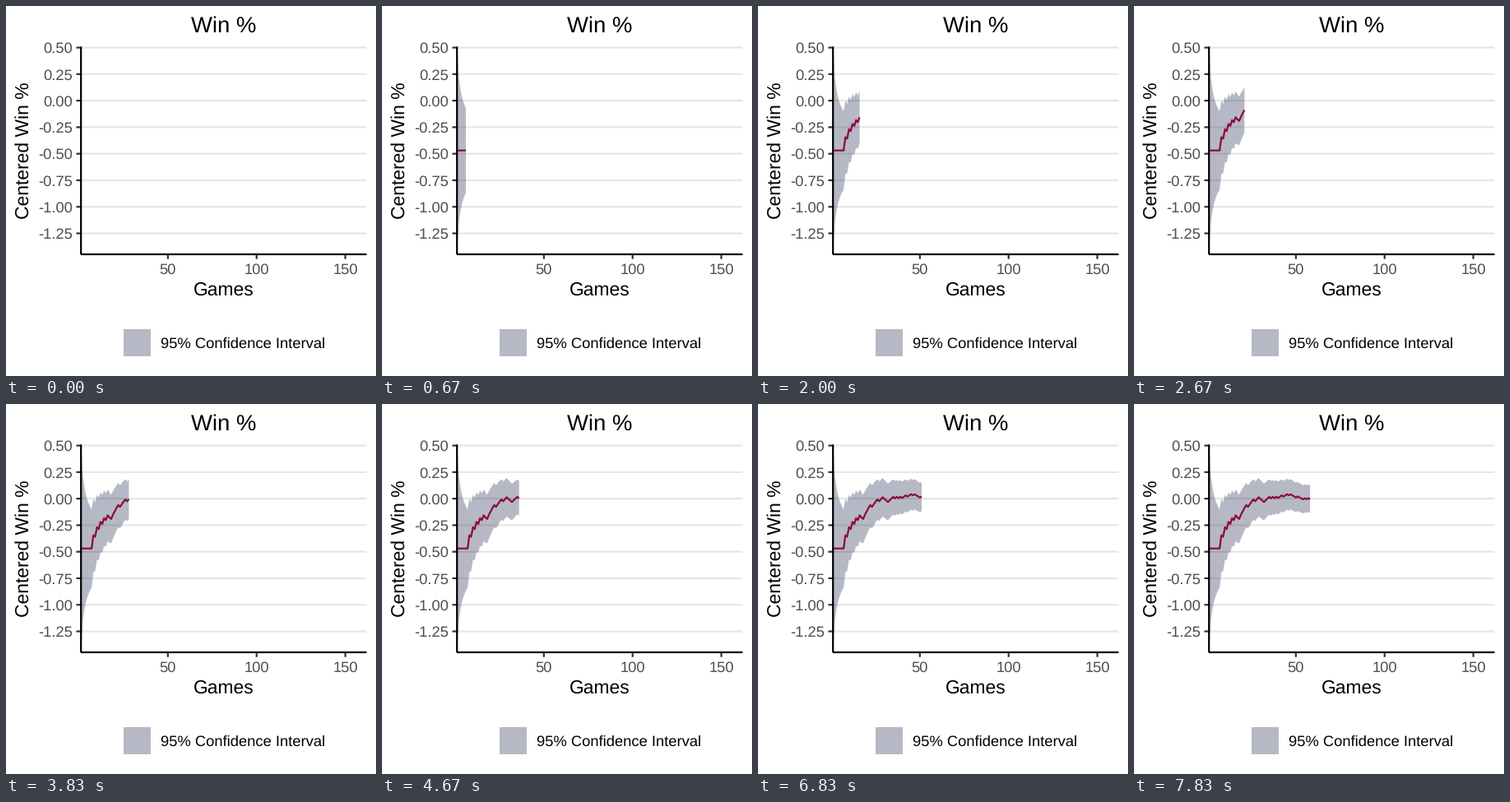
These frames come from a looping animation (450 by 450 pixels, 8000 ms). A matplotlib script:

```python
import matplotlib.pyplot as plt
import numpy as np
from matplotlib.animation import FuncAnimation
from matplotlib.patches import Rectangle

SIZE, DPI = 450, 150
FRAMES, LOOP_MS = 48, 8000
GAMES, STEPS = 162, 130            # full season and reveal steps for it
LEFT, RIGHT, TOP, BOTTOM = 91.2, 438.54, 49.4, 302.0
BAND, LINE = "#0f1941", "#8c0a3c"
STROKE = 2.22 * 72 / DPI

# season so far: one letter per game
RESULTS = ("LLLLLLLWLWLWLWLWLLWWWWLWWWLWWLLL"
           "WWWLWLWLWWLWWLWLLLWLLLWLWLL")
SEASON_PCT = 76 / 162

game = np.arange(1, len(RESULTS) + 1)
wins = np.cumsum([r == "W" for r in RESULTS])
pct = wins / game - SEASON_PCT
spread = 1.96 * np.sqrt(SEASON_PCT * (1 - SEASON_PCT) / game)
y_max, y_min = spread[0] - SEASON_PCT, -spread[0] - SEASON_PCT


def px(g):
    return LEFT + (g - 1) * (RIGHT - LEFT) / (GAMES - 1)


def py(v):
    return TOP + (y_max - v) * (BOTTOM - TOP) / (y_max - y_min)


plt.rcParams["font.family"] = "Liberation Sans"
plt.rcParams["text.hinting"] = "none"
fig = plt.figure(figsize=(SIZE / DPI, SIZE / DPI), dpi=DPI, facecolor="white")
ax = fig.add_axes([0, 0, 1, 1])
ax.set_xlim(0, SIZE)
ax.set_ylim(SIZE, 0)
ax.axis("off")


def stroke(xs, ys, color, z):
    return ax.plot(xs, ys, color=color, lw=STROKE, zorder=z, snap=False,
                   solid_capstyle="butt", solid_joinstyle="round")[0]


def label(x, y, text, size, color="black", ha="center", **kw):
    ax.text(x, y, text, fontsize=size, color=color, ha=ha, va="baseline", **kw)


for v in np.arange(0.5, -1.3, -0.25):
    y = py(v)
    stroke([LEFT, RIGHT], [y, y], "#e6e6e6", 1)
    stroke([LEFT - 5.73, LEFT], [y, y], "#333333", 4)
    label(80.7, y + 6.5, f"{v:.2f}", 8.8, "#4d4d4d", "right")

for g in (50, 100, 150):
    x = px(g)
    stroke([x, x], [BOTTOM, BOTTOM + 5.73], "#333333", 4)
    label(x, 326, str(g), 8.8, "#4d4d4d")

stroke([LEFT, LEFT], [TOP, BOTTOM], "black", 5)
stroke([LEFT, RIGHT], [BOTTOM, BOTTOM], "black", 5)

mid_x, mid_y = (LEFT + RIGHT) / 2, (TOP + BOTTOM) / 2
label(mid_x, 32, "Win %", 13.2)
label(mid_x, 352, "Games", 11)
ax.text(28.2, mid_y, "Centered Win %", fontsize=11, rotation=90,
        rotation_mode="anchor", ha="center", va="baseline")

ax.add_patch(Rectangle((143, 393), 33, 33, fc=BAND, alpha=0.3, lw=0))
label(188.5, 416, "95% Confidence Interval", 8.8, ha="left")

band = ax.fill([], [], fc=BAND, alpha=0.3, lw=0, zorder=2)[0]
line = stroke([], [], LINE, 3)


def draw(i):
    n = round(1 + i * (GAMES - 1) / STEPS)
    x, mean, half = px(game[:n]), pct[:n], spread[:n]
    upper, lower = py(mean + half), py(mean - half)
    band.set_xy(np.column_stack([np.r_[x, x[::-1]],
                                 np.r_[upper, lower[::-1]]]))
    line.set_data(x, py(mean))
    return band, line


anim = FuncAnimation(fig, draw, frames=FRAMES, interval=LOOP_MS / FRAMES,
                     repeat=True, repeat_delay=0)
plt.show()
```
